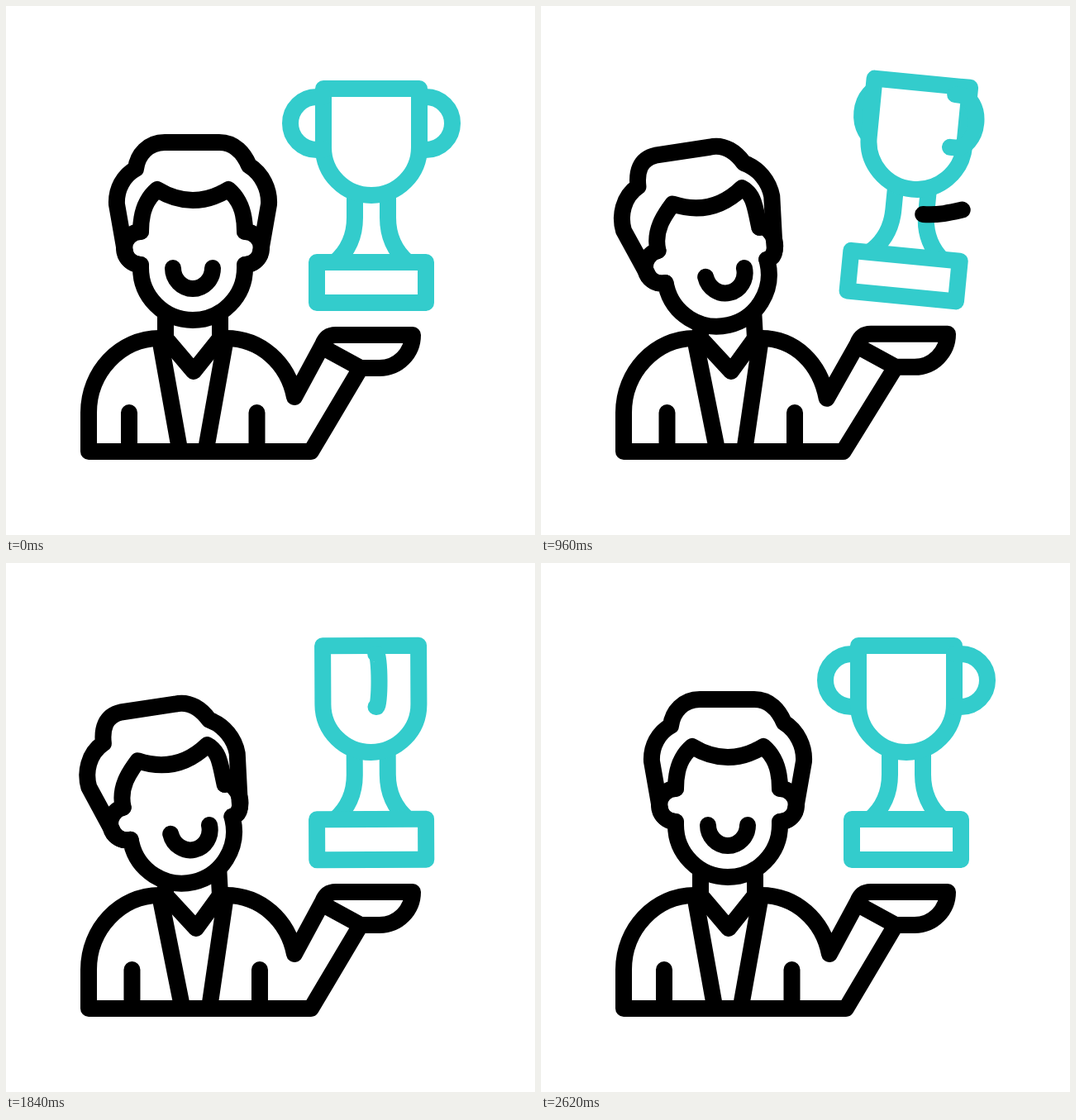
These frames come from a looping animation (640 by 640 pixels, 3000 ms). An HTML page:

```html
<!DOCTYPE html>
<html lang="en">
<head>
<meta charset="utf-8">
<title>Trophy</title>
<style>
  html, body { margin: 0; width: 100%; height: 100%; overflow: hidden; background: #fff; }
  svg { display: block; width: 100vw; height: 100vh; }
  path { fill: none; stroke: #000; stroke-width: 20; stroke-linecap: round; stroke-linejoin: round; }
  #trophy path { stroke: #33cccc; }
  #trophy .swoosh { stroke: #000; }
  #trophy .solid, .solid { fill: #fff; }
</style>
</head>
<body>
<svg viewBox="0 0 640 640">
  <path id="neck"/>
  <path id="collar"/>
  <path id="lapels"/>
  <path id="sleeves"/>
  <path id="torso"/>
  <path id="hand"/>
  <g id="head">
    <path id="face" class="solid"/>
    <path id="hair"/>
    <path id="fringe" class="solid"/>
    <path id="mouth"/>
  </g>
  <g id="trophy">
    <path id="back"/>
    <path d="M422 231V256C422 280 413 297 398 310M462 231V256C462 280 471 297 486 310"/>
    <path class="solid" d="M376 310H508V359H376Z"/>
    <path class="solid" d="M384 100H500V171A58 58 0 0 1 384 171Z"/>
    <path id="front"/>
    <path id="swoosh1" class="swoosh" pathLength="1" d="M362 239C385 255 420 258 455 258C475 258 490 253 505 248"/>
    <path id="swoosh2" class="swoosh" pathLength="1" d="M362 202C385 220 425 227 462 223C490 219 515 212 522 199"/>
  </g>
</svg>
<script>
const LOOP = 3000, STEP = 20;
const el = id => document.getElementById(id);
const draw = (id, d) => el(id).setAttribute('d', d);

// Tables of [time, value]
const LEAN = [[200, 0], [800, 1], [1800, 1], [2400, 0]];
const HAND = [[200, 0], [600, 25], [1200, -15], [1800, 0]];
const ARMPIT = [[200, 0], [600, 11], [1200, -3], [1800, 0]];
const ARM_X = [[600, 0], [1200, -5], [1800, 0]];
const LIFT = [[200, 0], [600, 25], [1200, -25], [1800, 0]];
const TILT = [[200, 0], [800, 8], [1400, -6.8], [2150, 3.5], [2620, 0]];
const SPIN = [[200, 0], [640, 80], [960, 135], [1260, 192], [1840, 276],
              [2200, 327], [2380, 349], [2620, 360]];

const ease = x => (1 - Math.cos(Math.PI * Math.min(1, Math.max(0, x)))) / 2;

function eased(keys, t) {
  let v = keys[0][1];
  for (let i = 1; i < keys.length; i++) {
    const [t0, a] = keys[i - 1], [t1, b] = keys[i];
    if (t >= t0) v = a + (b - a) * ease((t - t0) / (t1 - t0));
  }
  return v;
}

// Smooth curve through all keys, at rest at both ends
function smooth(keys, t) {
  const last = keys.length - 1;
  if (t <= keys[0][0]) return keys[0][1];
  if (t >= keys[last][0]) return keys[last][1];
  const slope = i => i === 0 || i === last ? 0 :
    (keys[i + 1][1] - keys[i - 1][1]) / (keys[i + 1][0] - keys[i - 1][0]);
  const i = keys.findIndex(k => k[0] > t) - 1;
  const [t0, a] = keys[i], [t1, b] = keys[i + 1];
  const d = t1 - t0, x = (t - t0) / d, r = 1 - x;
  return a * (1 + 2 * x) * r * r + b * x * x * (3 - 2 * x)
    + d * x * r * (slope(i) * r - slope(i + 1) * x);
}

function drawBody(t, k) {
  const h = eased(HAND, t), x = eased(ARM_X, t), pit = eased(ARMPIT, t);
  const s = 3.5 * k;
  draw('neck', `M193 366V402M${259 - 2 * k} 366L259 402`);
  draw('collar', `M193 402L${227 + 3 * k} 442L259 402`);
  draw('lapels', `M186 402L${210.5 + 3 * k} 539M266 402L${241.5 + 4.5 * k} 539`);
  draw('sleeves', `M${149 + s} 492V539M${303.5 + s} 492V539`);
  draw('torso', `M186 402C138 402 100 443 100 492V539H${369 + x}L429 ${438 + h}`);
  draw('hand', `M266 402C308 402 ${341 + x} ${432 + pit / 2} ${349 + x} ${473 + pit}
    L383 ${410 + h}C386 ${402 + h} 391 ${398 + h} 399 ${398 + h}H492
    C492 ${420 + h} 474 ${438 + h} 452 ${438 + h}H429L385 ${414 + h}`);
}

// As the head turns, the features slide one way and the hair the other
function drawHead(k) {
  const f = 10 * k, h = -6 * k, up = -5 * k;
  el('head').setAttribute('transform',
    `translate(${-13.2 * k} ${7.7 * k}) rotate(${-13 * k} 226 317)`);
  const ear = `A${20 + h} 20 0 0 0`;
  draw('face', `M163 273A20 20 0 0 0 163 313V317A63 63 0 0 0 289 317V313${ear} 289 273`);
  draw('hair', `M163 313C153 313 145 306 144 297L${134 + h} 240
    C${133 + h} 222 ${142 + h} ${205 + up} 157 ${197 + up}
    C159 ${180 + up} ${172 + h} ${165 + up} ${192 + h} ${165 + up}
    L${258 + h} 165C${277 + h} 165 ${288 + h} 179 ${294 + h} 193
    C${310 + h} 203 ${319 + h} 222 ${318 + h} 240L${308 + h} 297C${307 + h} 306 299 313 289 313`);
  draw('fringe', `M163 273C163 248 ${170 + f} 233 ${183 + f} 222
    Q${226 + f} 248 ${269 + f} 222C${282 + f} 233 289 248 289 273`);
  draw('mouth', `M${202 + f} 317c0 14 11 25 24 25s24 -11 24 -25`);
}

// c is the signed width of a handle seen at an angle
function handle(c) {
  const x = r => 442 + r * c;
  const arc = `A${Math.abs(32 * c)} 32 0 0 ${c > 0 ? 1 : 0}`;
  return `M${x(58)} 110L${x(66)} 110${arc} ${x(66)} 174L${x(58)} 174`;
}

function trim(id, start, end) {
  const s = el(id).style;
  s.display = end - start > 0.002 ? '' : 'none';
  s.strokeDasharray = `${end - start} 2`;
  s.strokeDashoffset = -start;
}

function drawTrophy(t) {
  const a = smooth(SPIN, t) * Math.PI / 180, c = Math.cos(a);
  const side = Math.sin(a) >= 0 ? -1 : 1;
  el('trophy').setAttribute('transform',
    `translate(0 ${eased(LIFT, t)}) rotate(${eased(TILT, t)} 442 300)`);
  draw('front', handle(side * c));
  draw('back', handle(-side * c));
  trim('swoosh1', ease((t - 770) / 310), ease((t - 450) / 310));
  trim('swoosh2', ease((t - 1095) / 300), ease((t - 960) / 240));
}

function render(t) {
  const k = eased(LEAN, t);
  drawBody(t, k);
  drawHead(k);
  drawTrophy(t);
}

const begin = performance.now();
function tick() {
  const t = (performance.now() - begin) % LOOP;
  render(Math.floor(t / STEP) * STEP);
  requestAnimationFrame(tick);
}
render(0);
requestAnimationFrame(tick);
</script>
</body>
</html>
```
